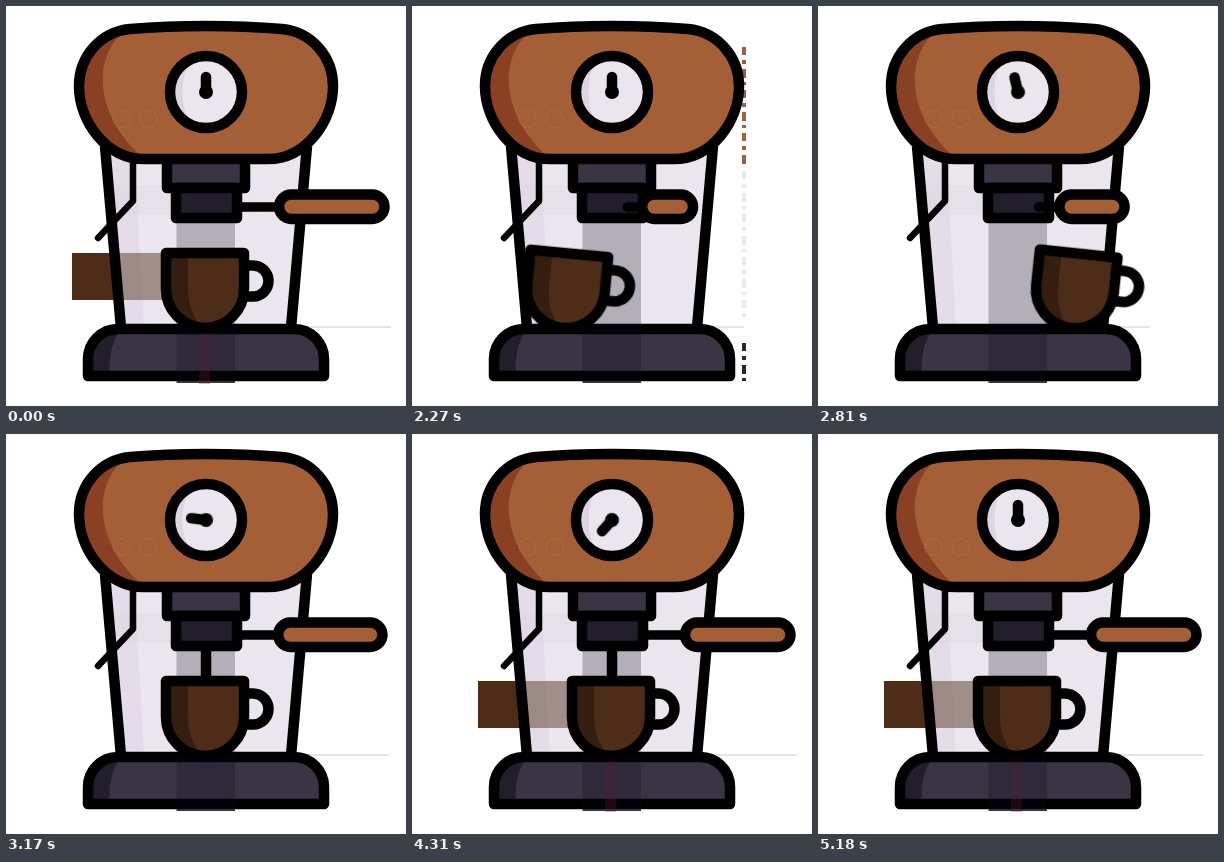
Recreate the animation shown at these times as an HTML page without scripts. Size 400 by 400 pixels, loop 5210 ms.

```html
<!DOCTYPE html>
<html lang="en">
<head>
<meta charset="utf-8">
<title>Coffee machine</title>
<style>
/* --q: how far the handle is turned away, 0 = fully out */
@property --q { syntax: "<number>"; inherits: true; initial-value: 0; }

html, body { margin: 0; width: 100%; height: 100%; overflow: hidden; background: #fff; }
svg {
  display: block; width: 100vw; height: 100vh;
  animation: turn 5210ms linear infinite;
}
.ink { stroke: #000; stroke-width: 10.5; stroke-linejoin: round; }
.line { fill: none; }

.shaft { transform: translateX(calc(-24px * var(--q))); }
.floor { transform: translateX(calc(-118px * var(--q))); }
.pill {
  x: calc(273px - 52px * var(--q));
  width: calc(105.5px - 66px * var(--q));
}
.cup { animation: slide 5210ms linear infinite; }
.tilt { transform-origin: 199px 284px; animation: tilt 5210ms linear infinite; }
.needle { transform-origin: 200px 86px; animation: swing 5210ms linear infinite; }
.stream { stroke-dasharray: 47 100; animation: pour 5210ms linear infinite; }
.smear { animation: smear 5210ms step-end infinite; }
.dots { animation: dots 5210ms step-end infinite; }

@keyframes turn {
  0%, 38.96% { --q: 0; }
  38.964% { --q: .085; animation-timing-function: cubic-bezier(.4,.15,.65,1); }
  46.45% { --q: 1.144; animation-timing-function: cubic-bezier(.37,0,.63,1); }
  62.1%, 100% { --q: 0; }
}
@keyframes slide {
  0%, 38.964% { transform: none; animation-timing-function: cubic-bezier(.333,0,.667,0); }
  47.6% { transform: translate(-294px, 2px); }
  47.601% { transform: translate(288px, 2px); animation-timing-function: cubic-bezier(.333,.667,.667,1); }
  59.117%, 100% { transform: none; }
}
@keyframes tilt {
  0%, 38.964% { transform: rotate(0deg); animation-timing-function: cubic-bezier(.333,0,.667,.333); }
  47.6% { transform: rotate(19deg); animation-timing-function: cubic-bezier(.4,.3,.6,1); }
  59.117%, 100% { transform: rotate(0deg); }
}
@keyframes swing {
  0%, 49.904% { transform: rotate(0deg); animation-timing-function: cubic-bezier(.37,0,.63,1); }
  72.937% { transform: rotate(-180deg); }
  74.856% { transform: rotate(-180deg); animation-timing-function: cubic-bezier(.37,0,.63,1); }
  99.424%, 100% { transform: rotate(0deg); }
}
@keyframes pour {
  0%, 57.58% { stroke-dashoffset: 47; }
  60.08%, 91.17% { stroke-dashoffset: 0; }
  95.01%, 100% { stroke-dashoffset: -47; }
}
@keyframes smear {
  0% { opacity: 1; }
  38.964% { opacity: 0; }
  62.572%, 100% { opacity: 1; }
}
@keyframes dots {
  0% { opacity: 0; }
  42.994% { opacity: 1; }
  44.722%, 100% { opacity: 0; }
}
</style>
</head>
<body>
<svg viewBox="0 0 400 400">
  <defs>
    <path id="head" d="M200 20Q240 20 276 23C306 26 327 51 327 80C327 115 300 153 262 153H138C100 153 73 115 73 80C73 51 94 26 124 23Q160 20 200 20Z"/>
    <path id="base" d="M82 370V353A30 30 0 0 1 112 323H288A30 30 0 0 1 318 353V370Z"/>
    <path id="bowl" d="M160 247H238V283A39 39 0 0 1 160 283Z"/>
    <clipPath id="inHead"><use href="#head"/></clipPath>
    <clipPath id="inBase"><use href="#base"/></clipPath>
    <clipPath id="inBowl"><use href="#bowl"/></clipPath>
    <clipPath id="inDial"><circle cx="200" cy="86" r="36"/></clipPath>
  </defs>

  <rect class="floor" x="300" y="320" width="85" height="2" fill="#e5e3e6"/>
  <rect x="280" y="320" width="52" height="2" fill="#e5e3e6"/>

  <g class="dots" fill="none" stroke-width="4" stroke-dasharray="8 5 4 5 9 4 3 5">
    <path d="M332 41V158" stroke="#a55f36"/>
    <path d="M332 165V312" stroke="#ebe8ec"/>
    <path d="M332 337V378" stroke="#2c2833"/>
  </g>

  <!-- body -->
  <path d="M99 140H301L285 322H115Z" fill="#ebe6ed"/>
  <path d="M99 140H128L138 322H115Z" fill="#e4dde9"/>
  <rect x="106" y="179" width="60" height="30" fill="#d8cbdc" opacity=".25"/>
  <g class="smear" fill="#4d2c18">
    <path d="M66 247H109L113 294H66Z"/>
    <path d="M109 247H160V294H113Z" opacity=".47"/>
  </g>
  <path class="ink line" d="M99 140L115 322M301 140L285 322"/>
  <path d="M127 150V195L92 232" fill="none" stroke="#000" stroke-width="6.500" stroke-linecap="round" stroke-linejoin="round"/>

  <!-- base -->
  <use href="#base" fill="#3b3444"/>
  <path d="M82 320H118Q101 338 104 372H82Z" fill="#221e2c" clip-path="url(#inBase)"/>
  <use href="#base" class="ink line"/>
  <rect x="170.500" y="213" width="58.500" height="162" fill="#0c0818" opacity=".25"/>
  <rect x="170.500" y="375" width="58.500" height="2" fill="#38343c"/>
  <rect class="smear" x="193" y="328" width="11" height="50" fill="#5a1c30" fill-opacity=".3"/>

  <path class="ink line stream" d="M200 205V252"/>

  <!-- brew group -->
  <path class="ink" d="M161 150H239V182H161Z" fill="#3b3444"/>
  <path class="ink" d="M170 182H231V212H170Z" fill="#221e2c"/>

  <!-- head -->
  <use href="#head" fill="#a55f36"/>
  <path d="M125 20C85 45 85 110 141 155H60V20Z" fill="#8a4023" clip-path="url(#inHead)"/>
  <g fill="none" stroke="#b9714c" stroke-dasharray="2 1.500" opacity=".9">
    <circle cx="115.500" cy="113" r="8.500"/>
    <circle cx="142.500" cy="113" r="8.500"/>
  </g>
  <use href="#head" class="ink line"/>

  <!-- gauge -->
  <circle cx="200" cy="86" r="36" fill="#ebe6ed"/>
  <path d="M190 48C172 66 172 106 190 124H160V48Z" fill="#ddd5e4" clip-path="url(#inDial)"/>
  <circle class="ink line" cx="200" cy="86" r="36"/>
  <g class="needle">
    <path class="ink line" d="M200 86V71" stroke-linecap="round"/>
    <circle cx="200" cy="86" r="7"/>
  </g>

  <!-- filter handle -->
  <g class="shaft">
    <path class="line" d="M235 201H271" stroke="#000" stroke-width="9.500"/>
    <circle cx="235" cy="201" r="4.750"/>
  </g>
  <rect class="ink pill" y="188.500" height="24.500" rx="12.250" fill="#a55f36"/>

  <!-- cup -->
  <g class="cup"><g class="tilt">
    <path class="ink line" d="M238 259.500H247A15.500 15.500 0 0 1 247 290.500H236"/>
    <use href="#bowl" fill="#4d2c18"/>
    <path d="M155 245H182V283Q182 308 199 324H155Z" fill="#351d0f" clip-path="url(#inBowl)"/>
    <use href="#bowl" class="ink line"/>
  </g></g>
</svg>
</body>
</html>
```
